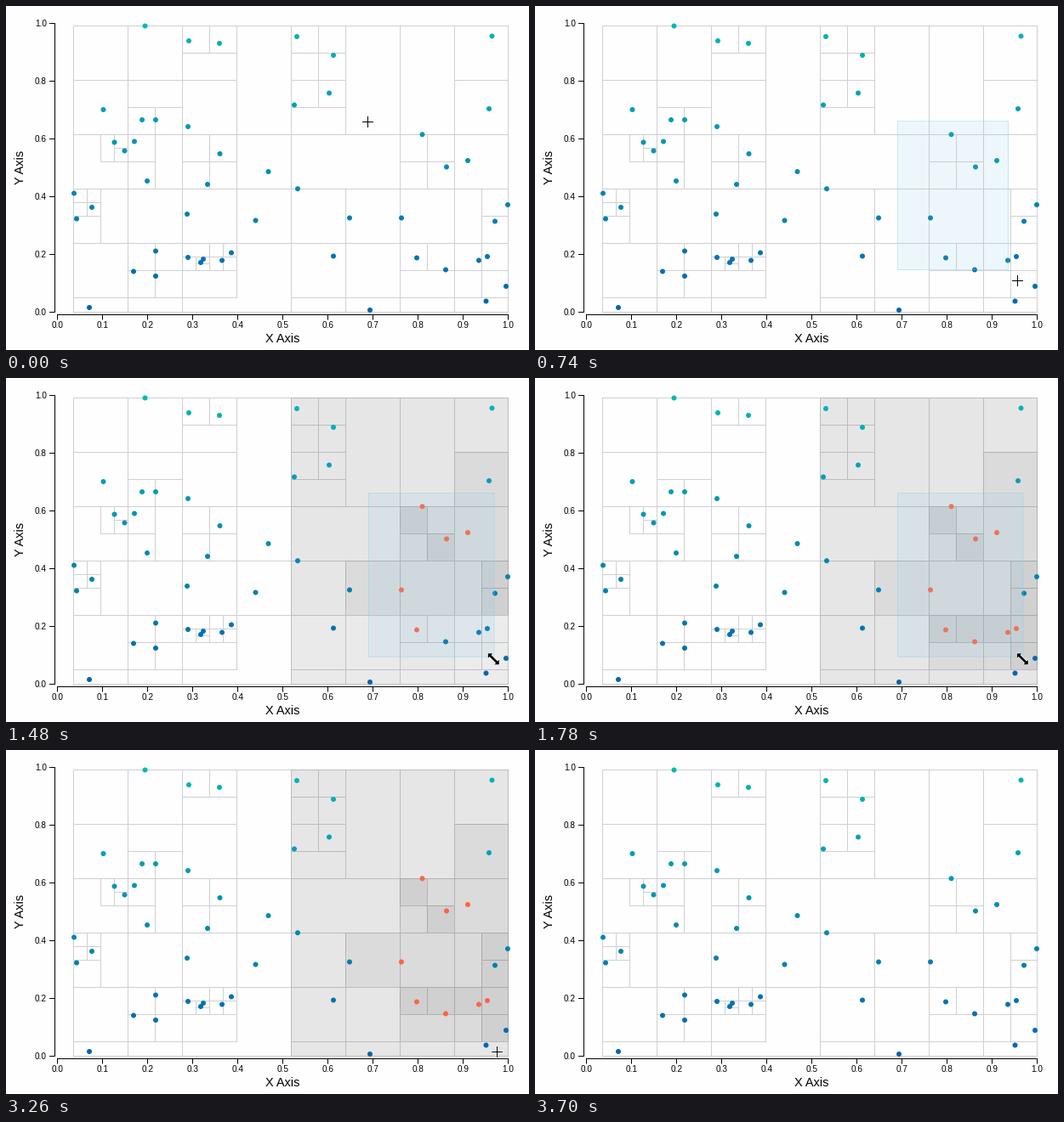
A matplotlib script that plays this animation: 615x405 px, repeating every 4430 ms.

```python
import matplotlib.pyplot as plt
import numpy as np
from matplotlib.animation import FuncAnimation
from matplotlib.collections import LineCollection, PolyCollection
from matplotlib.patches import Polygon, Rectangle

W, H, DPI = 615, 405, 100
PX = 72 / DPI
LOOP, STEP = 4430, 10

PLOT_RIGHT, PLOT_BOTTOM = 591, 361
ROOT = (79, 23, 512)
BRUSH_START = (426.5, 135.5)
BRUSH_END = (574, 328.5)
SEARCH_START, NODE_DELAY, FADE = 885, 30, 150
BRUSH_GONE, CLEARED = 3260, 3410
SHADE = 0.046
TOP_COLOR = np.array([0, 184, 184]) / 255
LOW_COLOR = np.array([0, 100, 176]) / 255
PICKED = np.array([252, 100, 71]) / 255

POINTS = np.array([
    163.5, 23.5, 215, 41, 251, 44, 342, 36, 385, 58, 571.5, 35.5,
    380, 102.5, 339, 116.5, 568, 121, 114.5, 122, 160, 134, 176, 134,
    214, 142, 127.5, 160.5, 151, 159.5, 139.5, 170.5, 251.5, 174,
    489.5, 151.3, 518, 189.5, 543, 182, 308.5, 195, 166, 206, 237, 210,
    80, 220.5, 343, 215.2, 101, 237, 83, 250.5, 213, 245, 293.5, 252.5,
    404, 249.5, 465, 249.5, 575, 253.5, 590, 234, 176, 288.5, 385, 294.5,
    214, 296, 232, 298, 229, 302, 254, 299.5, 265, 290.5, 483, 296.5,
    517, 310.5, 556, 299.5, 566, 295, 588, 330, 150, 312.5, 176, 318,
    98, 355, 428, 358, 564.5, 347.5,
]).reshape(-1, 2)

# The picture is held between these times (ms).
CHANGES = [0, 450, 590, 740, 880, 1030, 1180, 1330, 1480, 1630, 1780,
           2530, 2670, 2970, 3120, 3260, 3410, 3550, 3700]

# time, cursor kind, position
CURSOR = [
    (0, "cross", 425.5, 136.5), (450, "cross", 427.5, 144.5),
    (590, "cross", 547.5, 302.5), (740, "cross", 567.5, 323.5),
    (880, "cross", 572.5, 329.5), (1030, "resize", 573.3, 330.8),
    (2530, "cross", 578.5, 342.5), (2670, "arrow", 589.5, 356),
    (2970, "arrow", 588.5, 355), (3120, "cross", 577.5, 355.5),
    (3410, "cross", 577.5, 358.5), (3550, "arrow", 584.5, 388),
    (3700, None, 0, 0),
]
# time, moving corner of the brush
BRUSH = [(590, 537.5, 290.5), (740, 556.5, 310.5), (880, 571.5, 326.5),
         (1030, *BRUSH_END)]

SHAPES = {
    "cross": np.array([
        (-.5, -6.5), (.5, -6.5), (.5, -.5), (6.5, -.5), (6.5, .5), (.5, .5),
        (.5, 6.5), (-.5, 6.5), (-.5, .5), (-6.5, .5), (-6.5, -.5),
        (-.5, -.5)]),
    "resize": np.array([
        (-6.5, -6.5), (-1, -6.5), (-2.8, -4.7), (4.7, 2.8), (6.5, 1),
        (6.5, 6.5), (1, 6.5), (2.8, 4.7), (-4.7, -2.8), (-6.5, -1)]),
    "arrow": np.array([
        (0, 0), (0, 15.5), (3.5, 12.2), (5.8, 17), (8.2, 16), (6, 11.2),
        (11.3, 11.2)]),
}


class Node:
    def __init__(self, x, y, size, members):
        self.x, self.y, self.size, self.members = x, y, size, members
        self.kids = []
        if len(members) > 1:
            half = size / 2
            px, py = POINTS[members].T
            for cy in (y, y + half):
                for cx in (x, x + half):
                    inside = ((px >= cx) & (px < cx + half)
                              & (py >= cy) & (py < cy + half))
                    if inside.any():
                        self.kids.append(Node(cx, cy, half, members[inside]))

    def walk(self):
        yield self
        for kid in self.kids:
            yield from kid.walk()

    def search(self):
        for kid in self.kids:
            if kid.meets_brush():
                yield kid
                yield from kid.search()

    def meets_brush(self):
        (x0, y0), (x1, y1) = BRUSH_START, BRUSH_END
        return (self.x < x1 and self.x + self.size > x0
                and self.y < y1 and self.y + self.size > y0)

    def corners(self, inset=0.0):
        x0, y0 = self.x + inset, self.y + inset
        x1 = min(self.x + self.size + inset, PLOT_RIGHT - inset)
        y1 = min(self.y + self.size + inset, PLOT_BOTTOM - inset)
        return [(x0, y0), (x1, y0), (x1, y1), (x0, y1)]


def in_brush(p):
    return all(a <= v <= b for a, v, b in zip(BRUSH_START, p, BRUSH_END))


def current(track, t):
    past = [key for key in track if key[0] <= t]
    return past[-1] if past else None


tree = Node(*ROOT, np.arange(len(POINTS)))
visited = list(tree.search())
starts = SEARCH_START + NODE_DELAY * np.arange(len(visited))
pick_time = {n.members[0]: s for n, s in zip(visited, starts)
             if not n.kids and in_brush(POINTS[n.members[0]])}

fig = plt.figure(figsize=(W / DPI, H / DPI), dpi=DPI, facecolor="#fefefe")
ax = fig.add_axes([0, 0, 1, 1])
ax.set_xlim(0, W)
ax.set_ylim(H, 0)
ax.axis("off")


def label(x, y, text, size, **kw):
    ax.text(x, y, text, fontsize=size * PX, family="Liberation Sans",
            color="black", **kw)


def lines(segments, color, z):
    art = LineCollection(segments, colors=color, linewidths=PX,
                         capstyle="projecting", zorder=z)
    art.set_snap(False)
    ax.add_collection(art)


def draw_axes():
    ticks = [[(57.5, 20.5), (57.5, 360.5)], [(60.5, 363.5), (590.5, 363.5)]]
    for i in range(6):
        y = 360.5 - 68 * i
        ticks.append([(51.5, y), (57.5, y)])
        label(48, y + 3.4, f"{i / 5:.1f}", 10, ha="right", va="baseline")
    for i in range(11):
        x = 60.5 + 53 * i
        ticks.append([(x, 363.5), (x, 369)])
        label(x, 379.3, f"{i / 10:.1f}", 10, ha="center", va="baseline")
    lines(ticks, "black", 2)
    label(325, 396, "X Axis", 14.5, ha="center", va="baseline")
    label(17, 190, "Y Axis", 14.5, ha="center", va="center", rotation=90)


draw_axes()
lines([c + c[:1] for c in (n.corners(0.5) for n in tree.walk())],
      "#d0d0d0", 1)

shades = PolyCollection([n.corners() for n in visited], linewidths=0,
                        edgecolors="none", zorder=3)
shades.set_snap(False)
ax.add_collection(shades)

mix = ((POINTS[:, 1] - 20) / 340)[:, None]
base_colors = TOP_COLOR * (1 - mix) + LOW_COLOR * mix
dots = ax.scatter(*POINTS.T, s=(6 * PX) ** 2, c=base_colors, linewidths=0,
                  zorder=4)

brush = Rectangle(BRUSH_START, 0, 0, facecolor=(0.53, 0.81, 0.92, 0.14),
                  edgecolor=(0.53, 0.81, 0.92, 0.4), linewidth=PX, zorder=5,
                  snap=False)
ax.add_patch(brush)

halo = Polygon(SHAPES["cross"], facecolor="white", edgecolor="white",
               linewidth=1.6 * PX, alpha=0.8, zorder=6, snap=False)
pointer = Polygon(SHAPES["cross"], facecolor="black", linewidth=0, zorder=7,
                  snap=False)
ax.add_patch(halo)
ax.add_patch(pointer)


def place_cursor(t):
    _, kind, x, y = current(CURSOR, t)
    for art in (halo, pointer):
        art.set_visible(kind is not None)
        if kind:
            art.set_xy(SHAPES[kind] + (x, y))


def place_brush(t):
    key = current(BRUSH, t)
    shown = key is not None and t < BRUSH_GONE
    brush.set_visible(shown)
    if shown:
        brush.set_width(key[1] - BRUSH_START[0])
        brush.set_height(key[2] - BRUSH_START[1])


def show_search(t):
    active = t < CLEARED
    fill = np.zeros((len(visited), 4))
    fill[:, 3] = SHADE * active * np.clip((t - starts) / FADE, 0, 1)
    shades.set_facecolor(fill)
    colors = base_colors.copy()
    for i, start in pick_time.items():
        if active and t >= start:
            colors[i] = PICKED
    dots.set_facecolor(colors)


def update(frame):
    t = max(c for c in CHANGES if c <= frame * STEP)
    place_cursor(t)
    place_brush(t)
    show_search(t)
    return shades, dots, brush, halo, pointer


anim = FuncAnimation(fig, update, frames=LOOP // STEP, interval=STEP,
                     init_func=lambda: update(0), repeat=True, repeat_delay=0)
plt.show()
```
